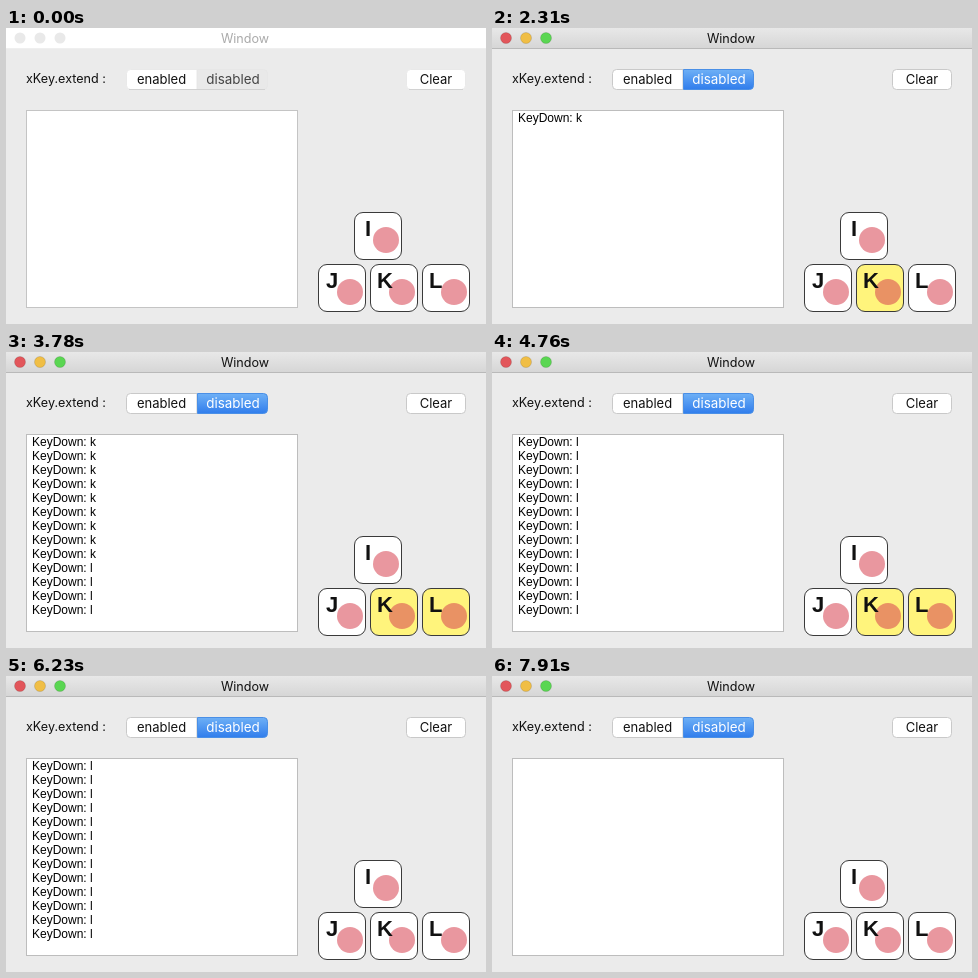
An HTML page that plays this animation: 480 by 296 pixels, repeating every 8 s.

```html
<!DOCTYPE html>
<html lang="en">
<head>
<meta charset="utf-8">
<title>Window</title>
<style>
  html, body { margin: 0; width: 100%; height: 100%; overflow: hidden; background: #ebebeb; }
  svg { display: block; width: 480px; height: 296px; }
  text { font: 13px Inter, Roboto, sans-serif; fill: #111; }
  .mid { text-anchor: middle; }
  .bar { fill: url(#bar); }
  .edge { stroke: #b9b9b9; }
  .light { stroke: rgba(0, 0, 0, .12); }
  .box { fill: #fff; stroke: #c9c9c9; }
  .off { fill: url(#blue); stroke: #4a8fe6; }
  .offText { fill: #fff; font-size: 13.4px; }
  .foot { stroke: none; }
  #log text { font: 12px "Liberation Sans", Arial, sans-serif; fill: #000; }
  .key rect { fill: #fff; stroke: #3a3a3a; }
  .key circle { fill: rgb(215, 65, 80); opacity: .55; }
  .key text { font: bold 22px "Liberation Sans", Arial, sans-serif; }
  .key.down rect { fill: #fff47c; }
  .list { stroke: #bdbdbd; }
  .idle .bar { fill: #fff; }
  .idle .edge { stroke: #efefef; }
  .idle .title { fill: #aaa; }
  .idle .light { fill: #e9e9e9; stroke: none; }
  .idle .box { stroke: #e9e9e9; }
  .idle .list { stroke: #c4c4c4; }
  .idle .foot { stroke: #d2d2d2; }
  .on .off { fill: #e9e9e9; stroke: #e7e7e7; }
  .on .offText { fill: #444; }
</style>
</head>
<body>
<svg id="win" viewBox="0 0 480 296">
  <defs>
    <linearGradient id="bar" x2="0" y2="1">
      <stop stop-color="#e8e8e8"/><stop offset="1" stop-color="#d6d6d6"/>
    </linearGradient>
    <linearGradient id="blue" x2="0" y2="1">
      <stop stop-color="#6eb0f6"/><stop offset="1" stop-color="#307dec"/>
    </linearGradient>
  </defs>
  <rect width="480" height="296" fill="#ebebeb"/>
  <rect class="bar" width="480" height="20"/>
  <path class="edge" d="M0 20.5H480"/>
  <rect class="light" x="8.5" y="4.5" width="11" height="11" rx="5.5" fill="#e2565b"/>
  <rect class="light" x="28.5" y="4.5" width="11" height="11" rx="5.5" fill="#f0be45"/>
  <rect class="light" x="48.5" y="4.5" width="11" height="11" rx="5.5" fill="#5ad652"/>
  <text class="title mid" x="239" y="14.5" style="font-size:12.6px">Window</text>
  <text x="20" y="55" style="font-size:12.6px">xKey.extend :</text>
  <path class="box" d="M191 41.5H124.5a4 4 0 0 0-4 4V57.5a4 4 0 0 0 4 4H191Z"/>
  <path class="off" d="M191.5 41.5H257.5a4 4 0 0 1 4 4V57.5a4 4 0 0 1-4 4H191.5Z"/>
  <text class="mid" x="155.5" y="56">enabled</text>
  <text class="mid offText" x="227" y="56">disabled</text>
  <rect class="box" x="400.5" y="41.5" width="59" height="20" rx="4"/>
  <path class="foot" d="M123 61.5H259M403 61.5H457"/>
  <text class="mid" x="430" y="56">Clear</text>
  <rect class="box list" x="20.5" y="82.5" width="271" height="197"/>
  <g id="log"></g>
  <g id="keys"></g>
</svg>
<script>
const LOOP = 8000, STEP = 70, ROWS = 13;
const ACTIVATE = 490, DISABLE = 560, CLEAR = 7350;
const REPEAT = 90;
// Each held key: when it goes down and up, when auto-repeat begins and ends.
const K = { down: 2080, up: 6020, repeat: 2510, stop: 3225 };
const L = { down: 3225, up: 5250, repeat: 3575, stop: 5250 };

const win = document.getElementById('win');
const log = document.getElementById('log');
const keys = document.getElementById('keys');

function add(parent, tag, attrs, text = '') {
  const el = document.createElementNS('http://www.w3.org/2000/svg', tag);
  for (const name in attrs) el.setAttribute(name, attrs[name]);
  el.textContent = text;
  return parent.appendChild(el);
}

function makeKey(letter, x, y, inset) {
  const g = add(keys, 'g', { class: 'key', transform: `translate(${x} ${y})` });
  add(g, 'rect', { x: .5, y: .5, width: 47, height: 47, rx: 8.5 });
  add(g, 'circle', { cx: 32, cy: 28, r: 13 });
  add(g, 'text', { x: inset, y: 24 }, letter);
  return g;
}

makeKey('I', 348, 184, 11);
makeKey('J', 312, 236, 8);
const keyK = makeKey('K', 364, 236, 7);
const keyL = makeKey('L', 416, 236, 7);
const rows = Array.from({ length: ROWS }, (_, i) => add(log, 'text', { x: 26, y: 94 + 14 * i }));

const held = (key, t) => t >= key.down && t < key.up;

function presses(key, t) {
  if (t < key.down) return 0;
  const end = Math.min(t, key.stop - 1);
  return end < key.repeat ? 1 : 2 + Math.floor((end - key.repeat) / REPEAT);
}

function draw(now) {
  const t = Math.min(Math.floor(now % LOOP / STEP) * STEP, LOOP - 90);
  win.classList.toggle('idle', t < ACTIVATE);
  win.classList.toggle('on', t < DISABLE);
  keyK.classList.toggle('down', held(K, t));
  keyL.classList.toggle('down', held(L, t));

  const cleared = t >= CLEAR;
  const typed = cleared ? '' : 'k'.repeat(presses(K, t)) + 'l'.repeat(presses(L, t));
  const shown = typed.slice(-ROWS);
  rows.forEach((row, i) => row.textContent = shown[i] ? 'KeyDown: ' + shown[i] : '');
}

const start = performance.now();
function tick() {
  draw(performance.now() - start);
  requestAnimationFrame(tick);
}
tick();
</script>
</body>
</html>
```
